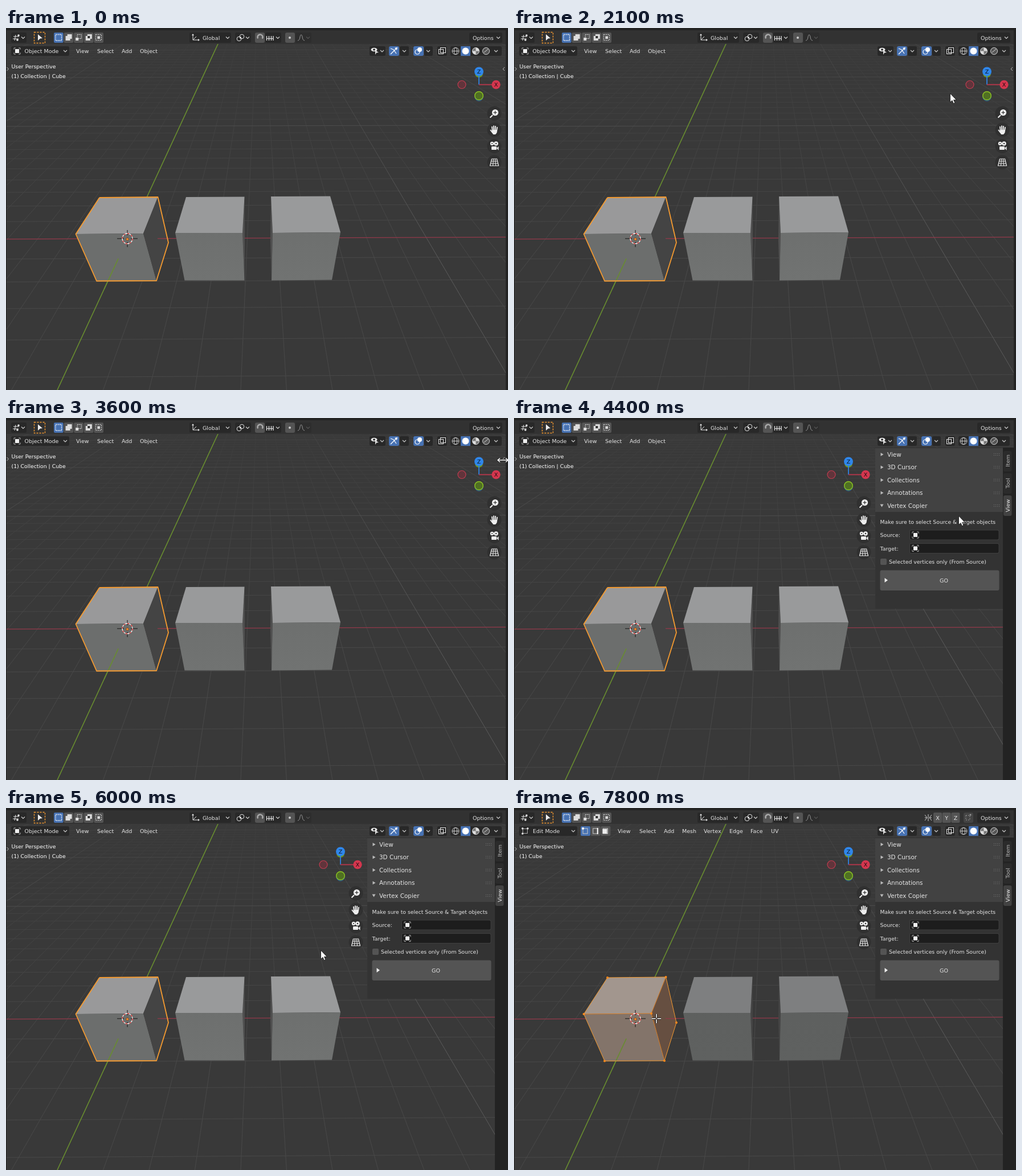
Write an HTML page with a canvas that moves like this. It is 881x636 px and loops after 8000 ms.

```html
<!DOCTYPE html>
<html lang="en">
<head>
<meta charset="utf-8">
<title>Viewport demo</title>
<style>
html, body { margin: 0; height: 100%; overflow: hidden; background: #232323; }
canvas { display: block; }
</style>
</head>
<body>
<canvas id="stage" width="881" height="636"></canvas>
<script>
const c = document.getElementById('stage').getContext('2d');
const LOOP = 8000, STEP = 100, PANEL_AT = 3700, EDIT_AT = 7700;
const BLUE = '#4772b3', DARK = '#282828', GREY = '#545454', INK = '#e6e6e6', ORANGE = '#f49a30';

// Pointer path: time, x, y
const path = [
  [600, 430, 14], [900, 540, 90], [1300, 617, 145], [1400, 633, 147], [1800, 735, 126], [1900, 735, 126],
  [2700, 855, 82], [2800, 859, 80], [3100, 872, 74], [3600, 872, 74], [3700, 869, 74], [3900, 869, 74],
  [4400, 780, 172], [4700, 795, 198], [4800, 795, 198], [5500, 678, 214], [5600, 678, 214],
  [6000, 552, 250], [6200, 805, 192], [6300, 805, 192], [6400, 821, 192], [6800, 253, 374],
  [6900, 253, 374], [7000, 245, 374], [7100, 245, 374], [7500, 250, 370], [8000, 250, 370]
];

function pointer(t) {
  const i = path.findIndex(k => k[0] > t);
  const [t0, x0, y0] = path[i - 1], [t1, x1, y1] = path[i];
  const f = (t - t0) / (t1 - t0);
  return [x0 + (x1 - x0) * f, y0 + (y1 - y0) * f];
}

// Drawing helpers
function box(x, y, w, h, fill, r = 3) {
  c.fillStyle = fill;
  c.beginPath();
  c.roundRect(x, y, w, h, r);
  c.fill();
}
function trace(pts) {
  c.beginPath();
  for (let i = 0; i < pts.length; i += 2) c.lineTo(pts[i], pts[i + 1]);
}
function line(color, width, ...pts) {
  trace(pts);
  c.strokeStyle = color;
  c.lineWidth = width;
  c.stroke();
}
function poly(fill, ...pts) {
  trace(pts);
  c.fillStyle = fill;
  c.fill();
}
function disc(x, y, r, fill, stroke, width = 1) {
  c.beginPath();
  c.arc(x, y, r, 0, 7);
  if (fill) { c.fillStyle = fill; c.fill(); }
  if (stroke) { c.strokeStyle = stroke; c.lineWidth = width; c.stroke(); }
}
function frame(x, y, w, h, color, width = 1, dash = []) {
  c.strokeStyle = color;
  c.lineWidth = width;
  c.setLineDash(dash);
  c.strokeRect(x, y, w, h);
  c.setLineDash([]);
}
function label(s, x, y, size = 9.4, color = INK, align = 'left') {
  c.font = size + 'px "DejaVu Sans", sans-serif';
  c.fillStyle = color;
  c.textAlign = align;
  c.textBaseline = 'alphabetic';
  c.fillText(s, x, y + 3.6);
}
const chevron = (x, y, color = '#ccc') => line(color, 1.2, x - 3, y - 1.5, x, y + 1.5, x + 3, y - 1.5);
const menu = (...items) => items.forEach(([s, x]) => label(s, x, 40.5, 9.5));
function objectIcon(x, y) {
  box(x - 3.5, y - 3.5, 7, 7, '#eee', 0);
  for (const sx of [-1, 1]) for (const sy of [-1, 1])
    line('#aaa', 1, x + sx * 2.5, y + sy * 5.5, x + sx * 5.5, y + sy * 5.5, x + sx * 5.5, y + sy * 2.5);
}

// Ground plane to screen
function ground(m, n) {
  const w = 1 + n / 15.27 + m * 0.00042;
  return [(213.4 + 52.71 * m + 29.16 * n) / w, -130 + 500 / w];
}
function fade(far, near) {
  const g = c.createLinearGradient(0, 28, 0, 400);
  g.addColorStop(0, far);
  g.addColorStop(1, near);
  return g;
}
function floor() {
  box(1, 4, 876, 632, '#393939', 0);
  const unit = fade('#3d3d3d', '#484848'), ten = fade('#434343', '#5a5a5a');
  for (const pass of [unit, ten]) {
    const style = k => (k % 10 === 0) === (pass === ten);
    for (let m = -30; m <= 40; m++)
      if (m && style(m)) line(pass, 1, ...ground(m, -7), ...ground(m, 38));
    for (let n = -6; n <= 34; n++)
      if (n && style(n)) line(pass, 1, ...ground(-32, n), ...ground(42, n));
  }
  line('#93394a', 1.3, ...ground(-6, 0), ...ground(14, 0));
  line('#688c30', 1.6, ...ground(0, -6), ...ground(0, 36));
}

function shade(top, bottom) {
  const g = c.createLinearGradient(0, 297, 0, 444);
  g.addColorStop(0, top);
  g.addColorStop(1, bottom);
  return g;
}
function cubes(edit) {
  const top = edit ? '#7e7f80' : '#999a9b';
  const front = edit ? shade('#5d5f5e', '#5f6160') : shade('#6b6d6c', '#717372');
  const side = edit ? '#454545' : '#505050';
  poly(side, 415, 360, 418.5, 297, 419, 380, 418.5, 443);
  poly(top, 316, 297, 418.5, 296.5, 415, 360, 297, 360);
  poly(front, 297, 360, 415, 360, 418.5, 443.5, 313.5, 443.5);
  poly(side, 465, 296, 468, 360, 466, 443, 464, 375);
  poly(top, 465, 296, 569, 295.5, 587, 359, 468, 360);
  poly(front, 468, 360, 587, 359, 572, 442.5, 466, 443.5);

  poly(edit ? '#a2968e' : '#99999a', 164, 298, 266.5, 297, 241, 361, 122.5, 362);
  poly(edit ? '#83746a' : '#6c6e6d', 122.5, 362, 241, 361, 264, 444, 159, 444.5);
  poly(edit ? '#664f41' : '#444', 241, 361, 266.5, 297, 285, 377, 264, 444);
  line('#93394a', 1.3, ...ground(1, 0), 285, 370);
  line('#688c30', 1.6, ...ground(0, -1), ...ground(0, -2.3));

  const rim = [164, 298, 266.5, 297, 285, 377, 264, 444, 159, 444.5, 122.5, 362, 164, 298];
  c.lineJoin = 'round';
  line(ORANGE, edit ? 1 : 1.8, ...rim);
  c.lineJoin = 'miter';
  if (edit) {
    line('#d87f28', 1, 122.5, 362, 241, 361, 266.5, 297);
    line('#d87f28', 1, 241, 361, 264, 444);
    for (let i = 0; i < 12; i += 2) disc(rim[i], rim[i + 1], 2, '#ff8a1c');
    disc(241, 361, 2, '#ff8a1c');
  }

  // 3D cursor and object origin
  for (const s of [-1, 1]) {
    line('#151515', 1, 213 + s * 6, 370, 213 + s * 18, 370);
    line('#151515', 1, 213, 370 + s * 6, 213, 370 + s * 15);
  }
  disc(213, 370, 9, null, '#fff', 1.3);
  c.setLineDash([3.5, 3.5]);
  disc(213, 370, 9, null, '#e03030', 1.3);
  c.setLineDash([]);
  disc(213, 371, 2.3, '#f58a2e', '#5a2c08', 0.6);
}

function topRow(edit) {
  box(1, 4, 876, 24, '#323232', 0);
  box(9, 8, 27, 18, DARK);
  line(INK, 1, 13, 15, 23, 15);
  line(INK, 1, 12, 19, 22, 19);
  line(INK, 1, 17, 12, 15, 22);
  disc(22, 13, 1.8, INK);
  disc(20, 21, 1.8, INK);
  chevron(30, 17);

  frame(49.5, 7.5, 19, 19, ORANGE, 1.4, [3, 2]);
  poly('#eee', 56, 11, 64, 18, 60, 18.5, 56, 22);

  for (let i = 0; i < 5; i++) {
    const x = 84 + i * 17.6;
    box(x, 8, 16.6, 18, i ? GREY : BLUE, 2);
    if (!i) frame(x + 3, 11.5, 10.5, 10.5, '#fff', 1.3, [2, 1.5]);
    if (i === 1) { box(x + 3, 14, 8, 8, '#ddd', 0); box(x + 6, 11, 8, 8, '#ddd', 0); }
    if (i === 2) { frame(x + 6, 11.5, 7, 7, '#ddd', 1, [2, 1]); box(x + 3, 17, 5, 5, '#ddd', 0); }
    if (i === 3) { box(x + 3, 14, 8, 8, '#ddd', 0); box(x + 6, 11, 8, 8, '#ddd', 0); box(x + 6.5, 14, 4, 4, '#333', 0); }
    if (i === 4) { frame(x + 3, 11.5, 10, 10, '#ddd', 1, [2, 1.5]); box(x + 6, 14.5, 4.5, 4.5, '#ddd', 0); }
  }

  box(322, 8, 73, 18, DARK);
  line(INK, 1, 328, 11, 328, 21, 339, 21);
  line(INK, 1, 328, 21, 334, 15);
  poly(INK, 326, 13, 328, 10, 330, 13);
  poly(INK, 337, 19, 340, 21, 337, 23);
  label('Global', 345, 17, 9.5);
  chevron(389, 17);

  box(402, 8, 28, 18, DARK);
  disc(409, 19, 3.8, null, INK);
  disc(414, 15, 3.8, null, INK);
  disc(411.5, 17, 1.4, INK);
  chevron(424, 17);

  box(437, 8, 17, 18, GREY);
  c.beginPath();
  c.arc(446, 16, 4.5, 2.6, 6.9);
  line_cap();
  box(455, 8, 28, 18, DARK);
  line(INK, 1, 457, 18.5, 469, 18.5);
  for (const x of [457.5, 461.5, 465.5, 469]) line(INK, 1.3, x, 14, x, 22);
  chevron(477, 17);

  box(490, 8, 17, 18, GREY);
  disc(498, 17, 2, '#ccc');
  box(508, 8, 28, 18, '#2d2d2d');
  c.beginPath();
  c.moveTo(512, 22);
  c.bezierCurveTo(517, 22, 515, 12, 518, 12);
  c.bezierCurveTo(521, 12, 519, 22, 524, 22);
  c.strokeStyle = '#999';
  c.lineWidth = 1;
  c.stroke();
  chevron(530, 17, '#555');

  if (edit) {
    line('#ccc', 1, 727, 11, 727, 23);
    for (const s of [-1, 1]) {
      line('#ccc', 1, 727 + s * 6, 12, 727 + s * 2, 17, 727 + s * 6, 22);
      line('#ccc', 1, 727 + s * 2, 17, 727 + s * 6, 17);
    }
    ['X', 'Y', 'Z'].forEach((s, i) => {
      box(736 + i * 15.7, 8, 15, 18, GREY, 2);
      label(s, 743.5 + i * 15.7, 17, 9.5, INK, 'center');
    });
    box(789, 8, 17, 18, '#444');
    frame(793, 13, 7, 8, '#999', 1, [2, 2]);
    disc(801, 12, 1.5, '#999');
  }
  box(813, 8, 58, 18, DARK);
  label('Options', 819, 17, 9.5);
  chevron(864, 17);
}
function line_cap() {
  c.strokeStyle = '#aaa';
  c.lineWidth = 2.5;
  c.stroke();
}

function menuRow(edit) {
  box(9, 32, 102, 17, DARK);
  if (edit) {
    frame(15.5, 36.5, 8, 8, '#aaa', 1);
    for (const [x, y] of [[15, 36], [24, 36], [15, 45]]) disc(x, y, 1.7, INK);
    label('Edit Mode', 33, 40.5, 9.5);
    for (let i = 0; i < 3; i++) {
      const x = 117 + i * 17.7;
      box(x, 32, 17, 17, i ? GREY : BLUE, 2);
      frame(x + 4, 36, 8, 9, '#ccc');
      if (!i) disc(x + 4, 36, 2, '#fff');
      if (i === 1) line('#fff', 2, x + 12, 35, x + 12, 46);
      if (i === 2) box(x + 3, 37, 8, 8, '#eee', 0);
    }
    menu(['View', 182], ['Select', 220], ['Add', 263], ['Mesh', 295], ['Vertex', 333],
      ['Edge', 378], ['Face', 415], ['UV', 451]);
  } else {
    objectIcon(19.5, 40.5);
    label('Object Mode', 32.5, 40.5, 9.5);
    menu(['View', 123], ['Select', 160], ['Add', 203], ['Object', 235]);
  }
  chevron(104, 40.5);

  box(638, 32, 28, 17, DARK);
  c.beginPath();
  c.ellipse(646, 38, 5.5, 3.2, 0, 0, 7);
  c.fillStyle = INK;
  c.fill();
  disc(646, 38, 1.8, '#222');
  poly(INK, 648, 39, 654, 43, 650, 43.5, 648, 47);
  chevron(660, 40.5);

  box(672, 32, 18, 17, BLUE);
  line('#fff', 1.2, 675, 36, 680, 38, 685, 45);
  line('#fff', 1.2, 675, 46, 686, 35);
  poly('#fff', 682, 35, 687, 34, 686, 39);
  box(691, 32, 16, 17, DARK);
  chevron(699, 40.5);

  box(715, 32, 18, 17, BLUE);
  disc(722, 42, 4, null, '#fff', 1.2);
  disc(726, 38, 4, '#fff');
  box(734, 32, 15, 17, DARK);
  chevron(741, 40.5);

  box(757, 32, 17, 17, DARK);
  frame(759.5, 37.5, 8, 8, INK);
  frame(762.5, 34.5, 9, 9, INK);

  box(780, 32, 90, 17, DARK);
  disc(789, 40.5, 6, null, '#ccc');
  line('#ccc', 1, 783, 40.5, 795, 40.5);
  c.beginPath();
  c.ellipse(789, 40.5, 2.7, 6, 0, 0, 7);
  c.stroke();
  box(798, 32, 17, 17, BLUE, 1);
  disc(806.5, 40.5, 6, '#fff');
  disc(824.5, 40.5, 6, '#777', '#ddd');
  poly('#ddd', 824.5, 34.5, 824.5, 40.5, 830.5, 40.5, 829, 36);
  poly('#ddd', 824.5, 40.5, 824.5, 46.5, 820, 45, 818.5, 40.5);
  disc(842.5, 40.5, 6, '#555', '#ddd');
  line('#ddd', 1, 839, 43, 846, 37);
  chevron(860, 40.5);

  label('User Perspective', 9.5, 67.5, 9.3, '#fff');
  label(edit ? '(1) Cube' : '(1) Collection | Cube', 9.5, 84.5, 9.3, '#fff');
  line('#bbb', 1, 1.5, 69, 4.5, 72, 1.5, 75);
}

function gizmo(x, hover) {
  if (hover) disc(x, 99.5, 37.5, '#676767');
  disc(x, 121, 7.2, '#274a6b', '#2c6294');
  disc(x, 80, 7, '#6d9a22');
  line('#2f83e3', 1.8, x, 99.5, x, 82);
  line('#b8354a', 1.8, x, 99.5, x + 26, 99.5);
  disc(x - 30, 99.5, 7, '#61343b', '#c13c50', 1.2);
  disc(x, 119, 7.3, '#507022', '#8cc323', 1.4);
  disc(x, 76.5, 8, '#2f86ea');
  disc(x + 30, 99.5, 7.7, '#d4364e');
  label('Z', x, 76.5, 9.5, '#0c1520', 'center');
  label('X', x + 30, 99.5, 9.5, '#200c10', 'center');
}

function navButtons(x) {
  for (const y of [150, 179, 207.5, 236]) disc(x, y, 12.5, '#303030');
  disc(x + 1.5, 148.5, 5.6, '#eee');
  line('#eee', 2.2, x - 3, 153, x - 7.5, 157.5);
  line('#333', 1.2, x - 1.5, 148.5, x + 4.5, 148.5);
  line('#333', 1.2, x + 1.5, 145.5, x + 1.5, 151.5);

  c.lineCap = 'round';
  [[-4, -6], [-1, -7.5], [2, -7], [5, -5]].forEach(([dx, dy]) =>
    line('#eee', 1.9, x + dx * 0.8, 181, x + dx, 179 + dy + 0.6));
  line('#eee', 2, x - 6.5, 179.5, x - 3, 184);
  c.lineCap = 'butt';
  poly('#eee', x - 4, 179, x + 5, 179, x + 4.5, 184, x + 2, 187, x - 2, 187, x - 5, 182);

  disc(x - 4, 203, 3.2, '#eee');
  disc(x + 3, 203, 3.8, '#eee');
  disc(x - 4, 203, 1, '#333');
  disc(x + 3, 203, 1.2, '#333');
  box(x - 5, 208, 9, 6, '#eee', 1);
  poly('#eee', x + 4, 211, x + 7.5, 208, x + 7.5, 215);

  const edge = [x - 4.5, 230, x + 4.5, 230, x + 7.5, 242, x - 7.5, 242, x - 4.5, 230];
  line('#eee', 1.2, ...edge);
  for (const s of [-1, 1]) line('#eee', 1, x + s * 1.5, 230, x + s * 2.5, 242);
  for (const [y, w] of [[234, 5.5], [238, 6.5]]) line('#eee', 1, x - w, y, x + w, y);
}

function panel() {
  box(858, 52, 19, 584, '#232323', 0);
  box(634, 52, 224, 283, '#333', 0);
  box(634, 53, 224, 112, '#424242', 0);
  ['View', '3D Cursor', 'Collections', 'Annotations', 'Vertex Copier'].forEach((s, i) => {
    const y = 64 + i * 22.5;
    if (i < 4) poly('#bbb', 643.5, y - 3, 648.5, y, 643.5, y + 3);
    else poly('#bbb', 642.5, y - 2.5, 648.5, y - 2.5, 645.5, y + 2.5);
    label(s, 655, y, 10.4);
    for (let k = 0; k < 8; k++) box(842 + (k >> 1) * 3, y - 2 + (k & 1) * 3, 1, 1, '#777', 0);
  });
  label('Make sure to select Source & Target objects', 642.5, 182, 9.25);
  [['Source:', 205.5], ['Target:', 229]].forEach(([s, y]) => {
    label(s, 642.5, y, 9.4);
    box(694, y - 9, 157.5, 18, '#3f3f3f');
    box(695, y - 8, 155.5, 16, '#1d1d1d', 2);
    objectIcon(704.5, y);
  });
  box(643, 247, 11, 11, GREY, 2);
  label('Selected vertices only (From Source)', 658, 252.5, 9.3);
  box(642.5, 267.5, 209, 35.5, GREY);
  poly('#eee', 650.5, 281, 656, 285, 650.5, 289);
  label('GO', 754.5, 285, 9.5, INK, 'center');

  [['Item', 75, 58], ['Tool', 114.5, 97], ['View', 154, 136]].forEach(([s, y, top], i) => {
    box(859, top, 14.5, 36, i === 2 ? '#424242' : '#2b2b2b');
    c.save();
    c.translate(866, y);
    c.rotate(-Math.PI / 2);
    label(s, 0, 0.2, 9.5, i === 2 ? '#eee' : '#bbb', 'center');
    c.restore();
  });
}

function arrow(x, y) {
  c.save();
  c.translate(x, y);
  const shape = [0.5, 0, 0.5, 15.5, 4, 12.3, 6.3, 17.6, 8.8, 16.5, 6.5, 11.3, 11.3, 11.3, 0.5, 0];
  poly('#fff', ...shape);
  line('#111', 0.8, ...shape);
  c.restore();
}
function resizeArrow(x, y) {
  for (const [color, w] of [['#222', 3], ['#fff', 1.5]]) {
    line(color, w, x - 8, y, x + 8, y);
    for (const s of [-1, 1]) line(color, w, x + s * 5, y - 3.5, x + s * 9, y, x + s * 5, y + 3.5);
  }
}
function crosshair(x, y) {
  for (const [color, w] of [['#111', 3.4], ['#fff', 1.6]])
    for (const s of [-1, 1]) {
      line(color, w, x + s * 1.5, y, x + s * 8, y);
      line(color, w, x, y + s * 1.5, x, y + s * 8);
    }
}

function draw() {
  const t = Math.floor(performance.now() % LOOP / STEP) * STEP;
  const edit = t >= EDIT_AT, open = t >= PANEL_AT, shift = open ? 243 : 0;
  const [x, y] = t < path[0][0] ? [-50, -50] : pointer(t);
  const resizing = t >= 3100 && t < PANEL_AT;
  box(0, 0, 881, 636, '#232323', 0);
  c.save();
  c.beginPath();
  c.rect(1, 4, 876, 632);
  c.clip();
  floor();
  cubes(edit);
  topRow(edit);
  if (open) panel();
  menuRow(edit);
  gizmo(830 - shift, !open && !resizing && Math.hypot(x - 830, y - 99.5) < 38);
  navButtons(857 - shift);
  if (!open) line('#bbb', 1, 875, 69, 872, 72, 875, 75);
  c.restore();
  if (edit) crosshair(x, y);
  else if (resizing) resizeArrow(x, y);
  else arrow(x, y);
  requestAnimationFrame(draw);
}
draw();
</script>
</body>
</html>
```
